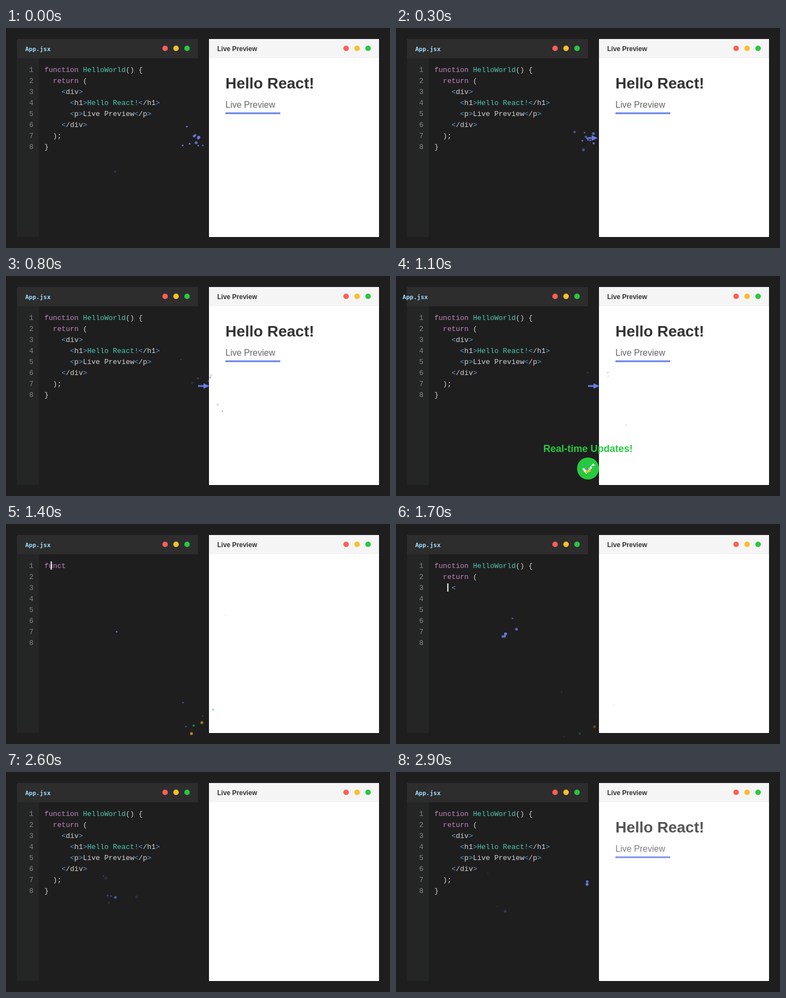
These frames come from a looping animation (700x400 px, 3 s). An HTML page with a canvas:

```html
<!DOCTYPE html>
<html lang="en">
<head>
<meta charset="utf-8">
<title>Live Preview</title>
<style>
html, body { margin: 0; width: 100%; height: 100%; overflow: hidden; background: #1e1e1e; }
canvas { display: block; width: 700px; height: 400px; }
</style>
</head>
<body>
<canvas id="stage" width="700" height="400"></canvas>
<script>
const ctx = document.getElementById('stage').getContext('2d');
const LOOP = 3000, STEP = 100;
const TYPE_START = 1350, TYPE_TIME = 1000;
const BLUE = '#667eea', GREEN = '#27c93f', AMBER = '#ffbd2e', RED = '#ff5f56';
const SANS = '"Liberation Sans", Arial, sans-serif';
const MONO = '13px "Liberation Mono", "Courier New", monospace';
const TITLE = 'bold 11px "DejaVu Sans Mono", monospace';
const CHAR = 7.8, ROW = 20;

const CODE = [
  'function HelloWorld() {',
  '  return (',
  '    <div>',
  '      <h1>Hello React!</h1>',
  '      <p>Live Preview</p>',
  '    </div>',
  '  );',
  '}'
];
const TOTAL = CODE.join('').length;

// Keywords, names and angle brackets, each with its ink.
const TOKENS = /(function|return|HelloWorld|Hello React!|[<>])/;
const inkOf = s =>
  /^(function|return)$/.test(s) ? '#c586c0' :
  /^Hello/.test(s) ? '#4ec9b0' :
  /^[<>]$/.test(s) ? '#569cd6' : '#d4d4d4';
const LINES = CODE.map(s => s.split(TOKENS));

function seeded(seed) {
  return () => (seed = seed * 16807 % 2147483647) / 2147483647;
}

// Sparks leave (x, y) at an even rate and drift off in straight lines.
function emitter(x, y, start, time, count, colors, seed) {
  const rand = seeded(seed);
  const speed = () => (rand() - 0.5) * 170;
  return Array.from({ length: count }, (_, i) => ({
    x, y,
    birth: start + time * i / count,
    vx: speed(),
    vy: speed(),
    r: 1.2 + rand() * 1.6,
    life: 700 + rand() * 500,
    color: colors[i % colors.length]
  }));
}

const SPARKS = [
  ...emitter(200, 200, TYPE_START, TYPE_TIME, 12, [BLUE], 90210),
  ...emitter(350, 200, 2800, 750, 10, [BLUE], 51413),
  ...emitter(350, 350, 920, 200, 7, [BLUE, AMBER, GREEN], 77031)
];

const ramp = (t, start, time) => Math.min(1, Math.max(0, (t - start) / time));

function rect(color, x, y, w, h) {
  ctx.fillStyle = color;
  ctx.fillRect(x, y, w, h);
}

function dot(color, x, y, r) {
  ctx.fillStyle = color;
  ctx.beginPath();
  ctx.arc(x, y, r, 0, Math.PI * 2);
  ctx.fill();
}

function text(str, x, y, font, color, align = 'left') {
  ctx.font = font;
  ctx.fillStyle = color;
  ctx.textAlign = align;
  ctx.fillText(str, x, y);
}

function line(color, width, ...points) {
  ctx.strokeStyle = color;
  ctx.lineWidth = width;
  ctx.beginPath();
  points.forEach(([x, y]) => ctx.lineTo(x, y));
  ctx.stroke();
}

function lights(x) {
  [RED, AMBER, GREEN].forEach((c, i) => dot(c, x + i * 20, 37, 5));
}

function drawCode(typed) {
  let left = Math.floor(typed * TOTAL);
  LINES.forEach((tokens, row) => {
    const y = 80 + row * ROW;
    text(row + 1, 50, y, MONO, '#858585', 'right');
    let x = 70;
    for (const token of tokens) {
      const part = token.slice(0, left);
      text(part, x, y, MONO, inkOf(token));
      x += part.length * CHAR;
      left -= part.length;
    }
  });
}

function drawEditor(t, titleAlign) {
  rect('#2d2d2d', 20, 20, 330, 35);
  rect('#242625', 20, 55, 40, 325);
  text('App.jsx', 35, 42, TITLE, '#9cdcfe', titleAlign);
  lights(290);

  const typed = t < TYPE_START ? 1 : ramp(t, TYPE_START, TYPE_TIME);
  drawCode(typed);
  if (typed < 1) {
    const pos = typed * CODE.length, row = Math.floor(pos);
    rect('#fff', 69.5 + (pos - row) * 30, 68 + row * ROW, 2, 15);
  }
}

function drawPreview(t) {
  rect('#fff', 370, 20, 310, 360);
  rect('#f5f5f5', 370, 20, 310, 35);
  text('Live Preview', 385, 42, 'bold 12px ' + SANS, '#333');
  lights(620);

  ctx.globalAlpha = t < TYPE_START ? 1 : ramp(t, 2650, 300);
  text('Hello React!', 400, 110, 'bold 28px ' + SANS, '#333');
  text('Live Preview', 400, 145, '16px ' + SANS, '#666');
  line(BLUE, 3, [400, 155], [500, 155]);
  ctx.globalAlpha = 1;
}

function drawArrow(t) {
  const grow = t < TYPE_START ? ramp(t, 50, 300) : 0;
  if (!grow) return;
  const tip = 351 + 20 * grow, back = Math.max(350, tip - 11);
  line(BLUE, 3, [350, 200], [back, 200]);
  ctx.fillStyle = BLUE;
  ctx.beginPath();
  ctx.moveTo(tip, 200);
  ctx.lineTo(back, 195);
  ctx.lineTo(back, 205);
  ctx.fill();
}

function drawSuccess(alpha) {
  ctx.globalAlpha = alpha;
  dot(GREEN, 350, 350, 20);
  line('#fff', 4, [341, 350], [347, 357], [361, 342]);
  text('Real-time Updates!', 350, 320, 'bold 18px ' + SANS, GREEN, 'center');
  ctx.globalAlpha = 1;
}

function drawSparks(t) {
  for (const { x, y, birth, vx, vy, r, life, color } of SPARKS) {
    const age = (t - birth + LOOP) % LOOP;
    if (age >= life) continue;
    ctx.globalAlpha = 1 - age / life;
    dot(color, x + vx * age / 1000, y + vy * age / 1000, r);
  }
  ctx.globalAlpha = 1;
}

function draw(t) {
  const success = t < TYPE_START ? ramp(t, 850, 200) : 0;
  rect('#1e1e1e', 0, 0, 700, 400);
  drawEditor(t, success ? 'center' : 'left');
  drawPreview(t);
  drawArrow(t);
  if (success) drawSuccess(success);
  drawSparks(t);
}

// The picture advances ten times a second; a small lead absorbs timer jitter.
const begin = performance.now();
function tick() {
  const t = performance.now() - begin + 20;
  draw(Math.floor(t / STEP) * STEP % LOOP);
  requestAnimationFrame(tick);
}
tick();
</script>
</body>
</html>
```
